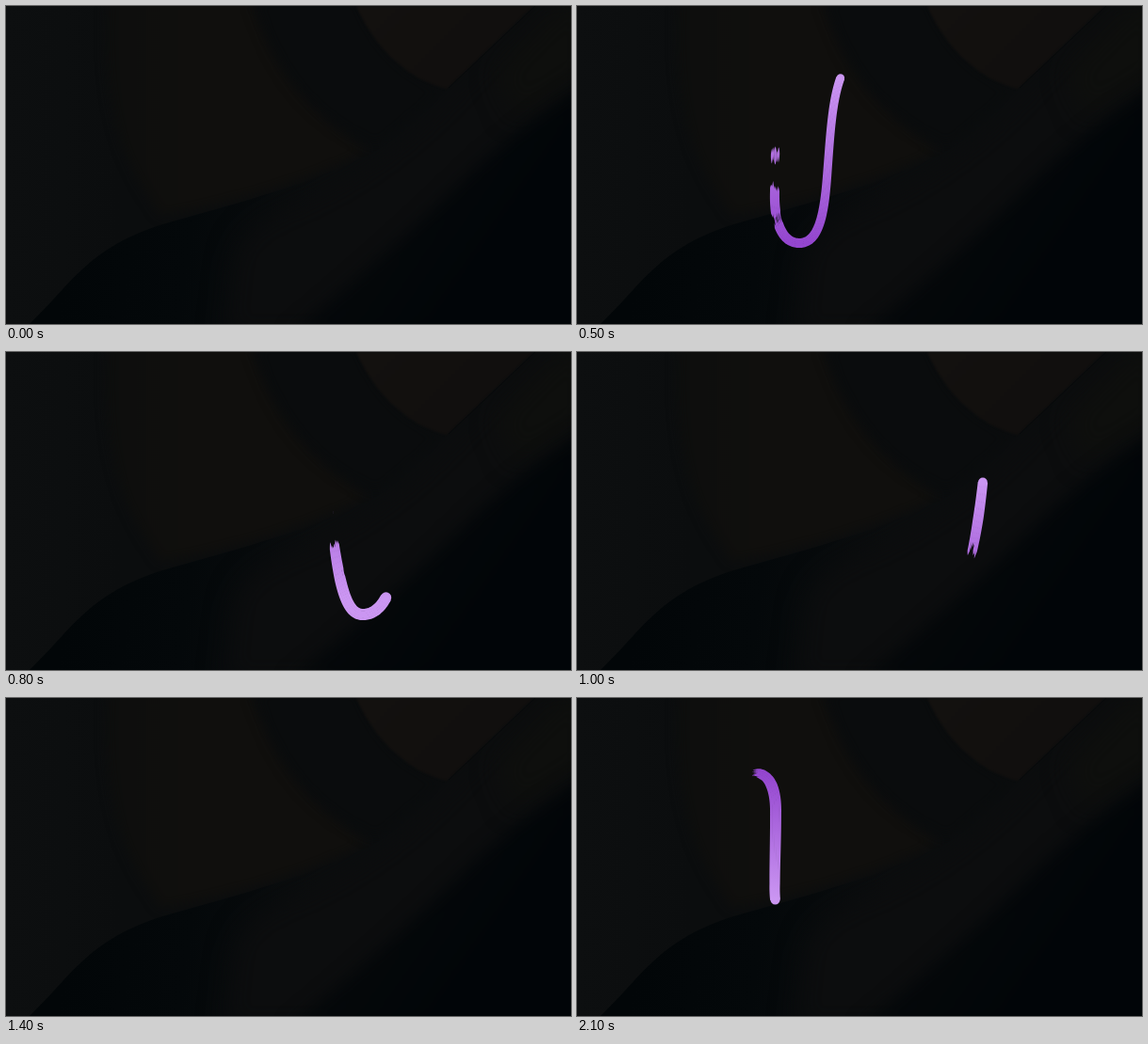
An HTML page with a canvas that plays this animation: 600x338 px, repeating every 2.2 s.

```html
<!DOCTYPE html>
<html>
<head>
<meta charset="utf-8">
<style>
html, body { margin: 0; width: 100%; height: 100%; overflow: hidden; background: #0b0d0e; }
canvas { display: block; }
</style>
</head>
<body>
<canvas id="stage" width="600" height="338"></canvas>
<script>
const W = 600, H = 338, LOOP = 2200, STEP = 100, RESTART = 2000;
const LIGHT = '#cb96f2', DARK = '#9446cf', HAIRS = 5;
const ctx = document.getElementById('stage').getContext('2d');

const clamp = (v, a = 0, b = 1) => Math.min(b, Math.max(a, v));
const random = n => { const v = Math.sin(n * 91.7 + 4.1) * 4375.5; return v - Math.floor(v); };

function smoothNoise(x, seed) {
  const i = Math.floor(x), f = x - i, e = f * f * (3 - 2 * f);
  return random(i + seed * 57) * (1 - e) + random(i + 1 + seed * 57) * e;
}

function svgPath(d) {
  const path = document.createElementNS('http://www.w3.org/2000/svg', 'path');
  path.setAttribute('d', d);
  return path;
}

// Centre line of the stroke, split where the brush is fastest
const rise = 'M166 101 C172 88 181 80 190 80 C204 80 211 96 211 120 C211 150 210 175 210 197' +
  ' C209 230 218 252 236 252 C258 252 263 218 266 175 C269 135 271 100 280 76';
const fall = ' C285 63 293 57 303 57 C328 57 338 110 342 150 C346 185 349 215 355 242' +
  ' C361 268 368 279 379 279 C391 279 399 270 404 260 C418 232 426 185 431 138';
const track = svgPath(rise + fall);
const LENGTH = track.getTotalLength(), MIDDLE = svgPath(rise).getTotalLength();

// One sample per pixel of length: position, unit normal, brush width
const samples = Array.from({ length: Math.floor(LENGTH) + 1 }, (_, s) => {
  const p = track.getPointAtLength(s);
  const a = track.getPointAtLength(s - 1), b = track.getPointAtLength(s + 1);
  const len = Math.hypot(b.x - a.x, b.y - a.y) || 1;
  return {
    x: p.x, y: p.y, nx: (a.y - b.y) / len, ny: (b.x - a.x) / len,
    w: 9.9 + 1.6 * Math.cos(2 * Math.PI * (s - 40) / 650)
  };
});

// Distance the brush has travelled: speeds up to the middle, then slows down
function travelled(ms) {
  const first = clamp((ms - 200) / 300), second = clamp((ms - 500) / 500);
  const rest = 1 - Math.pow(1 - second, 1.36);
  return MIDDLE * Math.pow(first, 2.1) + (LENGTH - MIDDLE) * rest;
}

// How much ink a hair still holds at distance s; the trail dries from its end
function ink(s, hair, gone, solid) {
  const q = clamp((s - gone) / Math.max(1, solid - gone));
  if (q === 1) return 1;
  const worn = .7 * smoothNoise(s / 24, 3) + .3 * smoothNoise(s / 16, 5 + hair);
  return clamp((q * q * 1.1 - worn) * 6);
}

function drawHair(hair, gone, solid, head) {
  const lane = (hair + .5) / HAIRS - .5;
  let left = [], right = [];
  const flush = () => {
    if (left.length > 1) {
      ctx.beginPath();
      left.concat(right.reverse()).forEach(p => ctx.lineTo(...p));
      ctx.fill();
    }
    left = [];
    right = [];
  };
  for (let s = Math.ceil(gone); s <= head; s++) {
    const p = samples[s], amount = ink(s, hair, gone, solid) * clamp(s / 8);
    if (!amount) { flush(); continue; }
    const spread = p.w * (.55 + .45 * clamp((s - gone) / Math.max(1, solid - gone)));
    const mid = lane * spread, half = (spread / HAIRS / 2 + .3) * amount;
    left.push([p.x + p.nx * (mid - half), p.y + p.ny * (mid - half)]);
    right.push([p.x + p.nx * (mid + half), p.y + p.ny * (mid + half)]);
  }
  flush();
}

function drawStroke(ms) {
  const head = travelled(ms), solid = travelled(ms - 85), gone = travelled(ms - 250);
  if (gone >= head) return;
  const tip = samples[Math.floor(head)];

  // Light at the tip, dark at the height farthest from it
  const reach = samples.slice(Math.floor(gone), Math.floor(head) + 1)
    .map(p => p.y - tip.y)
    .reduce((far, dy) => Math.abs(dy) > Math.abs(far) ? dy : far, 0);
  const fill = ctx.createLinearGradient(0, tip.y, 0, tip.y + Math.sign(reach) * Math.max(50, Math.abs(reach)));
  fill.addColorStop(0, LIGHT);
  fill.addColorStop(1, DARK);
  ctx.fillStyle = fill;

  for (let hair = 0; hair < HAIRS; hair++) drawHair(hair, gone, solid, head);
  if (solid < head) {
    ctx.beginPath();
    ctx.arc(tip.x, tip.y, tip.w / 2, 0, 7);
    ctx.fill();
  }
}

function makeBackdrop() {
  const c = document.createElement('canvas');
  c.width = W;
  c.height = H;
  const g = c.getContext('2d');
  const shade = (x0, y0, x1, y1, ...colors) => {
    const s = g.createLinearGradient(x0, y0, x1, y1);
    colors.forEach((col, i) => s.addColorStop(i / (colors.length - 1), col));
    return s;
  };
  const shape = (path, fill, blur = 0) => {
    g.filter = blur ? `blur(${blur}px)` : 'none';
    g.fillStyle = fill;
    g.fill(new Path2D(path));
  };
  g.fillStyle = shade(0, 0, 120, 0, '#0d0f10', '#0b0d0e');
  g.fillRect(0, 0, W, H);
  shape('M108 -9 H262 C285 60 320 110 385 154 Q290 200 165 223 C130 175 100 120 108 -9Z',
    shade(100, 0, 300, 0, '#0d0e0d', '#100f0d', '#100f0d'), 6);
  shape('M262 -9 H374 C390 40 425 75 468 88 L395 150 C325 120 285 70 262 -9Z', '#0a0c0d', 7);
  shape('M372 0 C390 42 425 78 468 88 L560 0Z', shade(400, 0, 480, 80, '#13110f', '#110f0e'), 1);
  const wave = 'M25 338 C70 295 85 260 160 234 C240 210 330 190 400 150 Q440 122 470 87 L562 0 H600 V338Z';
  shape(wave, shade(60, 300, 310, 338, '#020608', '#04080a', '#0b0d0e'));
  g.save();
  g.clip(new Path2D(wave));
  shape('M230 350 C250 280 220 250 300 216 Q400 175 480 90 L570 -9 H620 V350Z', '#0c0d0e', 14);
  shape('M520 70 L600 -10 H620 V70 L540 120Z', '#0e0f0d', 14);
  shape('M300 350 Q400 268 480 190 Q540 130 620 80 V350Z',
    shade(400, 220, 500, 290, '#05080a', '#010508'), 9);
  g.restore();
  g.filter = 'none';
  g.strokeStyle = '#07090a';
  g.stroke(new Path2D('M470 87 L562 0'));
  return c;
}

const backdrop = makeBackdrop();

function render() {
  const ms = Math.floor(performance.now() % LOOP / STEP) * STEP;
  ctx.drawImage(backdrop, 0, 0);
  // The next stroke already begins before the loop ends
  drawStroke(ms < RESTART ? ms : ms - RESTART + 300);
  requestAnimationFrame(render);
}
render();
</script>
</body>
</html>
```
